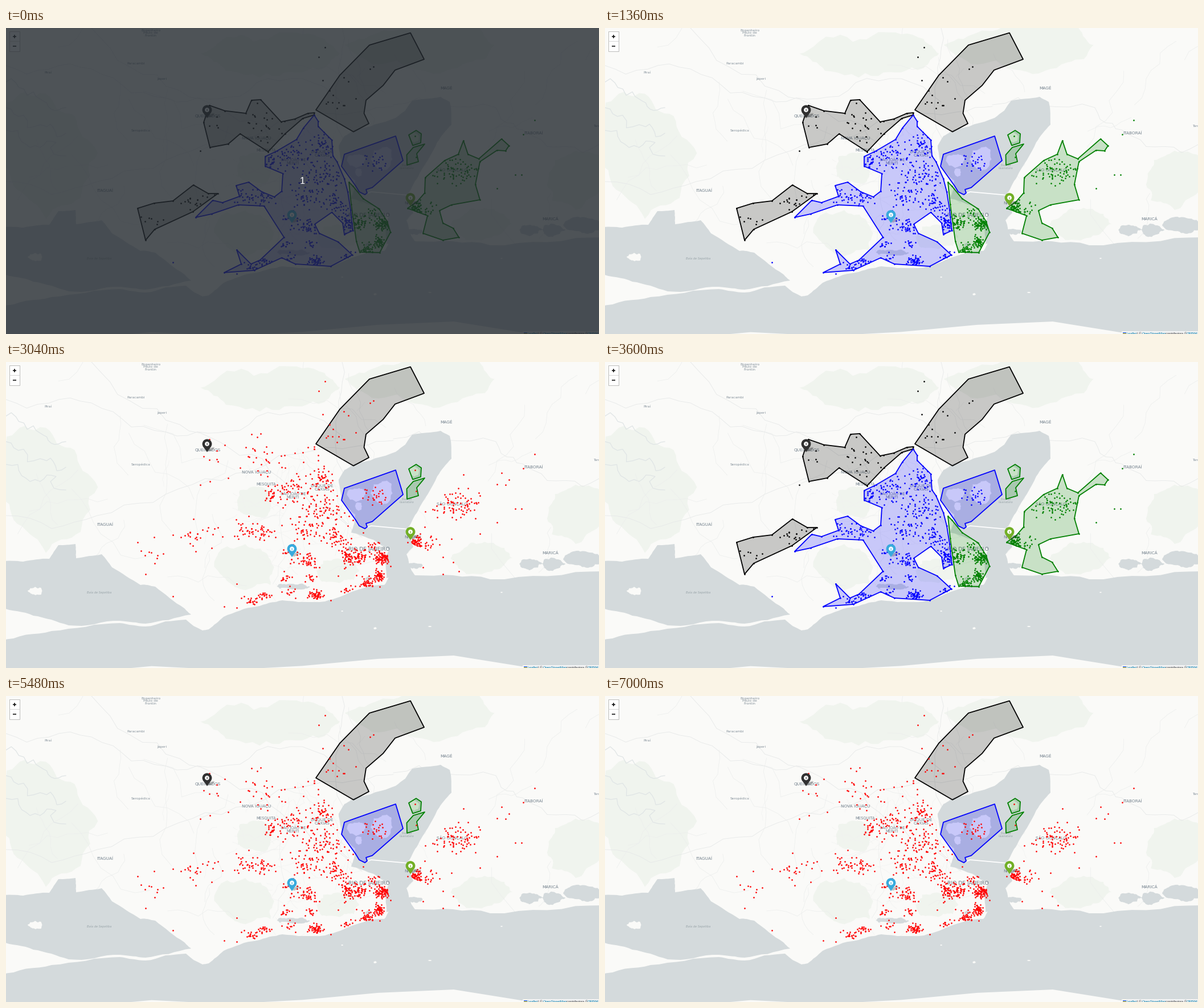
Animation, 1041 px wide and 538 px high, one loop 8000 ms. Source, as a matplotlib script:

```python
import numpy as np
import matplotlib.pyplot as plt
from matplotlib.animation import FuncAnimation
from matplotlib.patches import Circle, Ellipse, PathPatch, Polygon, Rectangle
from matplotlib.path import Path

W, H, DPI = 1041, 538, 64
FRAMES, INTERVAL = 80, 100
SWITCHES = (22, 36, 47, 60, 70)      # frames where the view toggles
PT = 72 / DPI                        # points per pixel
LAND, WATER, PARK, ROAD = "#fafaf8", "#d4dadc", "#f0f4ee", "#e6e8e8"
rng = np.random.default_rng(21)

plt.rcParams["font.family"] = "DejaVu Sans"
fig = plt.figure(figsize=(W / DPI, H / DPI), dpi=DPI, facecolor=LAND)
ax = fig.add_axes([0, 0, 1, 1])
ax.set_xlim(0, W)
ax.set_ylim(H, 0)
ax.axis("off")


def rough(points, amp, closed=True):
    """Break straight edges into a natural, uneven line."""
    pts = np.array(points, float)
    if closed:
        pts = np.vstack([pts, pts[:1]])
    for _ in range(3):
        step = np.diff(pts, axis=0)
        normal = np.column_stack([-step[:, 1], step[:, 0]])
        mid = pts[:-1] + step / 2 + normal * rng.normal(0, amp, (len(step), 1))
        out = np.empty((2 * len(pts) - 1, 2))
        out[::2], out[1::2] = pts, mid
        pts = out
    return pts


def area(points, color, z, amp=0.04):
    ax.add_patch(Polygon(rough(points, amp), fc=color, ec="none", zorder=z))


def blob(x, y, rx, ry, color, z):
    a = np.linspace(0, 2 * np.pi, 9)[:-1]
    r = rng.uniform(0.8, 1.15, a.size)
    area(np.column_stack([x + rx * r * np.cos(a), y + ry * r * np.sin(a)]), color, z, 0.1)


def line(points, color=ROAD, width=0.8, z=1.6, amp=0.08):
    ax.plot(*rough(points, amp, closed=False).T, color=color, lw=width * PT, zorder=z)


def label(x, y, text, size=7.4, color="#72808c", **style):
    style = {"ha": "center", "va": "center_baseline", "zorder": 6, **style}
    return ax.text(x, y, text, fontsize=size * PT, color=color, **style)


# --- base map -------------------------------------------------------------
for park in [(70, 220, 85, 110), (480, 45, 130, 42), (730, 30, 120, 45), (435, 245, 32, 26),
             (420, 360, 55, 40), (585, 367, 38, 24), (835, 345, 55, 25), (1000, 265, 55, 50)]:
    blob(*park, PARK, 1)

OCEAN = [(-9, 491), (80, 473), (200, 459), (245, 465), (316, 453), (345, 472), (356, 470),
         (382, 448), (440, 430), (485, 419), (560, 421), (613, 402), (664, 392), (672, 378),
         (710, 363), (718, 375), (850, 382), (1050, 368), (1050, 550), (-9, 550)]
SEPETIBA = [(-9, 350), (30, 351), (76, 346), (92, 322), (122, 320), (123, 345), (168, 338),
            (186, 361), (236, 392), (262, 395), (313, 433), (325, 444), (245, 460), (200, 455),
            (110, 463), (48, 446), (-9, 432)]
GUANABARA = [(594, 190), (612, 179), (684, 158), (713, 128), (763, 121), (779, 130), (782, 170),
             (757, 201), (723, 262), (706, 291), (715, 325), (703, 338), (713, 371), (668, 380),
             (666, 345), (673, 330), (646, 313), (606, 300), (613, 268), (589, 245), (584, 207)]
for shore in (OCEAN, SEPETIBA, GUANABARA):
    area(shore, WATER, 2, 0.025)
for lagoon in [(922, 355, 19, 10), (960, 355, 20, 11), (1015, 346, 36, 13),
               (505, 395, 33, 5), (636, 381, 5, 4), (716, 358, 14, 5)]:
    blob(*lagoon, WATER, 2)
for island in [(615, 233, 15, 12), (660, 231, 20, 22), (619, 254, 7, 8), (717, 192, 9, 9),
               (52, 403, 13, 8), (648, 468, 3, 2), (590, 438, 2, 1), (744, 465, 3, 1),
               (870, 405, 2, 1)]:
    blob(*island, LAND, 3)

for y in (95, 140, 180):             # winding reservoir arms
    line([(0, y), (60, y + 30), (105, y + 45)], "#dfe4e5", 1.2, amp=0.25)
for road in [[(0, 66), (150, 72), (300, 130), (440, 96), (590, 130)],
             [(150, 0), (305, 110), (450, 170), (600, 285)],
             [(0, 270), (160, 270), (350, 205), (560, 150), (680, 138)],
             [(590, 0), (578, 140), (585, 275), (625, 308)],
             [(680, 135), (860, 140), (925, 190), (1041, 205)]]:
    line(road)
for _ in range(30):                  # country roads
    start, turn = rng.uniform((0, 0), (W, 380)), rng.uniform(0, 2 * np.pi)
    line([start, start + rng.uniform(80, 190) * np.array([np.cos(turn), np.sin(turn)])],
         "#eceeed", 0.7, amp=0.12)
for _ in range(120):                 # faint street grain of the built-up area
    start = rng.normal((525, 270), (75, 65))
    line([start, start + rng.normal(0, 20, 2)], "#f1f2f1", 0.6, 1.5)
line([(634, 291), (641, 288), (707, 294)], "white", 1.7, 4, 0)

for x, y, town in [(254, 9, "Engenheiro\nPaulo de\nFrontin"), (228, 62, "Paracambi"),
                   (74, 78, "Piraí"), (274, 90, "Japeri"), (237, 180, "Seropédica"),
                   (1042, 172, "Tanguá")]:
    label(x, y, town, 6, "#84909a", va="center", linespacing=0.93)
for x, y, city in [(174, 286, "ITAGUAÍ"), (354, 155, "QUEIMADOS"), (440, 194, "NOVA IGUAÇU"),
                   (555, 221, "DUQUE DE\nCAXIAS"), (714, 308, "NITERÓI"),
                   (783, 249, "SÃO GONÇALO"), (773, 106, "MAGÉ"), (926, 185, "ITABORAÍ"),
                   (956, 336, "MARICÁ")]:
    label(x, y, city, va="center", linespacing=0.88)
label(457, 215, "MESQUITA", 6.8)
label(504, 234, "SÃO JOÃO DE\nMERITI", 6.8, va="center", linespacing=0.92)
label(637, 328, "RIO DE JANEIRO", 9.3, "#6b7985")
label(164, 405, "Baía de Sepetiba", 5.1, "#9aa5aa", style="italic")
label(704, 244, "Baía de\nGuanabara", 4.6, "#9aa5aa", style="italic", va="center")

# --- delivery regions -----------------------------------------------------
BLACK_FIXED = [(544, 144), (586, 83), (638, 30), (710, 8.5), (734, 55), (683, 74),
               (662, 101), (632, 127), (628.5, 150), (637, 168), (610, 182.5)]
BLUE_FIXED = [(594, 222), (684, 190), (697, 233), (643, 280.5), (632, 284), (634, 290),
              (630, 293), (620, 288), (614, 278), (589, 243)]
GREEN_TOP = [(707, 188), (720, 180), (729, 186), (728, 202), (714, 206.5)]
GREEN_LOW = [(703.5, 223), (715, 210), (735, 204), (721, 221), (724, 235), (704, 241)]
BLACK_WEST = [(231, 317), (260, 308), (293, 304), (329, 276), (355, 291), (372, 291),
              (328, 323), (261, 354), (245, 373)]
BLACK_NORTH = [(357, 136), (384, 145.5), (421, 150), (431, 127), (447, 126), (483, 165),
               (507, 160), (530, 150), (541, 149), (541, 153), (521, 159), (490, 186),
               (460, 217.5), (411, 186), (390, 204), (358, 210), (347, 166)]
BLUE_MAIN = [
    (541, 153), (548, 164), (548, 173), (572, 197), (574, 225), (581, 235), (594, 265),
    (600, 288), (605, 320), (609, 356), (594, 363), (591, 343), (572, 324), (542, 345),
    (550, 361), (583, 376), (608, 399), (570, 419), (508, 415), (484, 404), (436, 426),
    (383, 430), (413, 415), (405, 390), (430, 415), (446, 408), (488, 368), (453, 313),
    (408, 311), (361, 327), (333, 333), (363, 303), (380, 307), (410, 296), (404, 277),
    (426, 271), (449, 288), (471, 297), (484, 287), (486, 256), (455, 243), (455, 226),
    (476, 216), (510, 196), (522, 176)]
GREEN_RIO = [(602, 271), (609, 278), (627, 300), (655, 318), (669, 340), (675, 359),
             (656, 395), (621, 394), (615, 375), (606, 310)]
GREEN_EAST = [
    (803, 198), (811, 222), (830, 230), (870, 195), (883, 207), (877, 216), (862, 215),
    (832, 235), (824, 275), (832, 302), (782, 311), (761, 321), (767, 343), (785, 352),
    (795, 368), (767, 373), (732, 361), (740, 330), (705, 317), (722, 305), (735, 290),
    (736, 263), (770, 233), (794, 222)]

HUBS = {
    "black": ([BLACK_FIXED], [BLACK_WEST, BLACK_NORTH]),
    "blue": ([BLUE_FIXED], [BLUE_MAIN]),
    "green": ([GREEN_TOP, GREEN_LOW], [GREEN_RIO, GREEN_EAST]),
}
OUTLIERS = {
    "black": [(560, 34), (549, 51), (556, 92), (341, 216), (645, 68), (639, 72), (593, 87),
              (601, 94)],
    "blue": [(293, 412), (405, 432), (605, 393), (613, 394)],
    "green": [(928, 162), (908, 187), (894, 258), (905, 258), (862, 282), (718, 190)],
}
# x, y, spread, count
BLACK_SPOTS = [(578, 128, 14, 10), (335, 303, 13, 17), (253, 335, 9, 7), (450, 172, 20, 24),
               (376, 175, 18, 4)]
BLUE_SPOTS = [(464, 232, 9, 26), (495, 215, 14, 26), (555, 205, 15, 40), (540, 245, 25, 54),
              (525, 296, 14, 40), (568, 265, 15, 32), (575, 312, 12, 40), (602, 340, 8, 50),
              (450, 299, 10, 28), (420, 296, 10, 18), (530, 350, 8, 34), (500, 337, 10, 16),
              (490, 381, 5, 12), (536, 381, 6, 12), (543, 411, 6, 46), (496, 406, 5, 10),
              (456, 413, 6, 18), (428, 420, 7, 16), (599, 403, 5, 9), (648, 236, 11, 24)]
GREEN_SPOTS = [(661, 345, 7, 78), (654, 377, 6, 54), (631, 390, 6, 36), (617, 340, 8, 46),
               (645, 330, 10, 22), (780, 248, 20, 56), (720, 316, 7, 50), (741, 318, 9, 14),
               (820, 255, 12, 12)]
SPOTS = {"black": BLACK_SPOTS, "blue": BLUE_SPOTS, "green": GREEN_SPOTS}


def spread(spot, regions):
    x, y, size, count = spot
    pts = rng.normal((x, y), (size, size * 0.8), (count * 6, 2))
    inside = np.any([Path(r).contains_points(pts) for r in regions], axis=0)
    return pts[inside][:count]


def draw_region(points, color):
    shape = Path(points + points[:1], closed=True)
    fill = PathPatch(shape, fc=color, alpha=0.2, lw=0, zorder=7)
    edge = PathPatch(shape, fc="none", ec=color, lw=1.8 * PT, joinstyle="round", zorder=8)
    return [ax.add_patch(fill), ax.add_patch(edge)]


def draw_dots(pts, color):
    return ax.scatter(*pts.T, s=(2.7 * PT) ** 2, c=color, linewidths=0, zorder=9)


assigned, stops = [], []
for hub, (fixed, computed) in HUBS.items():
    for region in fixed:
        draw_region(region, hub)
    for region in computed:
        assigned += draw_region(region, hub)
    inner = [spread(spot, fixed + computed) for spot in SPOTS[hub]]
    pts = np.vstack([OUTLIERS[hub]] + computed + inner)
    assigned.append(draw_dots(pts, hub))
    stops.append(pts)
pending = draw_dots(np.vstack(stops), "red")


# --- pins, controls, credits ----------------------------------------------
def pin(x, y, color):
    ax.add_patch(Ellipse((x + 7, y + 9), 13, 5, angle=-30, fc="black", alpha=0.22, zorder=10))
    ax.add_patch(Polygon([(x - 7.6, y + 3), (x, y + 14), (x + 7.6, y + 3)], fc=color, zorder=11))
    ax.add_patch(Circle((x, y - 0.5), 8.4, fc=color, zorder=11))
    ax.add_patch(Circle((x, y - 0.5), 3.9, fc="white", zorder=12))
    label(x, y - 0.4, "i", 6, color, weight="bold", family="DejaVu Serif", zorder=13)


pin(353, 144.5, "#303030")
pin(502, 329, "#38aadd")
pin(710, 299, "#72af26")

ax.add_patch(Rectangle((5.5, 6), 18, 34.5, fc="white", ec="#bdbdbb", lw=PT, zorder=14))
ax.plot([6, 23], [23.2, 23.2], color="#cccccc", lw=0.8 * PT, zorder=15)
bar = dict(color="black", lw=1.5 * PT, zorder=15, solid_capstyle="butt")
for y in (14.8, 31.6):
    ax.plot([11.6, 18.2], [y, y], **bar)
ax.plot([14.9, 14.9], [11.5, 18.1], **bar)

ax.add_patch(Rectangle((907, 532.5), 134, 6, fc="white", alpha=0.7, lw=0, zorder=14))
for y, color in [(535, "#4c7be1"), (537, "#ffd500")]:
    ax.add_patch(Rectangle((909, y), 6, 2, fc=color, lw=0, zorder=15))
for x, text, color in [(916, "Leaflet", "#0078a8"), (934, "| ©", "#333333"),
                       (943, "OpenStreetMap", "#0078a8"), (984, "contributors ©", "#333333"),
                       (1021, "ORBIM", "#0078a8")]:
    label(x, 539, text, 6, color, ha="left", va="baseline", family="Liberation Sans", zorder=15)

# --- opening cover --------------------------------------------------------
cover = [
    ax.add_patch(Rectangle((0, 0), W, H, fc="#23292f", alpha=0.8, lw=0, zorder=20)),
    label(520.5, 269, "1", 16, "white", va="center", family="Liberation Sans", zorder=21),
]


def update(frame):
    show_pending = sum(frame >= s for s in SWITCHES) % 2 == 1
    pending.set_visible(show_pending)
    for artist in assigned:
        artist.set_visible(not show_pending)
    for artist in cover:
        artist.set_visible(frame == 0)
    return [pending, *assigned, *cover]


anim = FuncAnimation(fig, update, frames=FRAMES, interval=INTERVAL, repeat=True,
                     init_func=lambda: update(0), blit=False)
plt.show()
```
